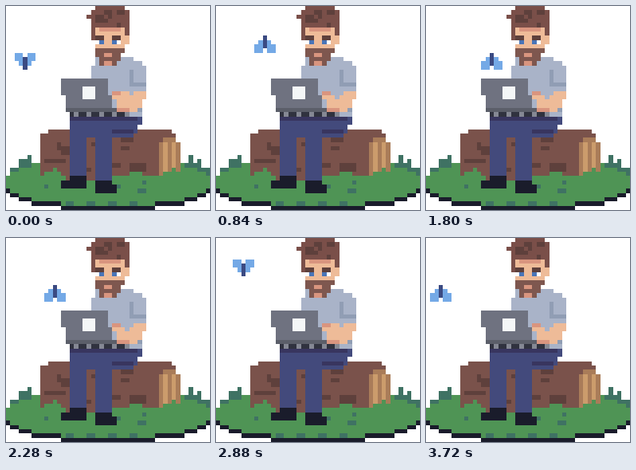
An HTML page with a canvas for the animation above (3840 ms loop, 256x256 px).

```html
<!DOCTYPE html>
<html lang="en">
<head>
<meta charset="utf-8">
<title>Working outdoors</title>
<style>
html, body { margin: 0; width: 100%; height: 100%; overflow: hidden; background: #fff; }
canvas { display: block; width: 256px; height: 256px; }
</style>
</head>
<body>
<canvas width="256" height="256"></canvas>
<script>
const ctx = document.querySelector('canvas').getContext('2d');
const CELL = 256 / 48, STEP = 120, STEPS = 32;
const GREEN = '#4f9455', TEAL = '#3f7263', BARK = '#7a524b', DARK_BARK = '#5e403c';
const SKIN = '#eebb98', BLUSH = '#d9957f', SHIRT = '#a9b3c8', FOLD = '#909db4';
const DENIM = '#434a7c', DARK_DENIM = '#38355f', INK = '#1a1c2b', METAL = '#6f7280';

const snap = v => Math.round(v * CELL);
const mix = (a, b, k) => a + (b - a) * k;

// All shapes are measured in cells of a 48 x 48 grid.
function block(color, x, y, w, h) {
  const left = snap(x), top = snap(y);
  ctx.fillStyle = color;
  ctx.fillRect(left, top, snap(x + w) - left, snap(y + h) - top);
}

// Superellipse, one strip per row.
function blob(color, cx, cy, rx, ry, power) {
  for (let y = cy - ry; y < cy + ry; y++) {
    const v = Math.abs(y + 0.5 - cy) / ry;
    const half = rx * (1 - v ** power) ** (1 / power);
    const left = Math.round(cx - half), right = Math.round(cx + half);
    block(color, left, y, right - left, 1);
  }
}

// Rows whose left and right ends slide from one span to another.
function taper(color, top, rows, [l0, r0], [l1, r1]) {
  for (let i = 0; i < rows; i++) {
    const k = i / (rows - 1), left = Math.round(mix(l0, l1, k));
    block(color, left, top + i, Math.round(mix(r0, r1, k)) - left, 1);
  }
}

function randomFrom(seed) {
  return () => (seed = seed * 16807 % 2147483647) / 2147483647;
}

function streaks(color, count, seed, x, y, w, h) {
  const random = randomFrom(seed);
  for (let i = 0; i < count; i++) {
    const length = 1 + Math.floor(random() * 4);
    block(color, x + Math.floor(random() * (w - length)), y + Math.floor(random() * h), length, 1);
  }
}

// Blades stand on the base row and alternate between tall and short.
function grass(color, from, to, base, height, seed) {
  const random = randomFrom(seed);
  for (let x = from; x < to; x++) {
    const arch = Math.sin((x - from + 1) / (to - from + 1) * Math.PI);
    const tall = Math.round(height * arch * (x % 2 ? 1 : 0.5 + 0.3 * random()));
    block(color, x, base - tall, 1, tall);
  }
}

function ground() {
  grass(TEAL, 1, 9, 40, 5, 7);
  grass(TEAL, 40, 48, 40, 5, 11);
  blob(INK, 24, 42.5, 24, 5.5, 2.2);
  blob(GREEN, 24, 41.5, 24, 5.5, 2.2);
  streaks(TEAL, 7, 23, 9, 41, 30, 3);
  for (let x = 14; x < 34; x += 5) block(TEAL, x, 46, 2, 1);
}

function log() {
  blob(BARK, 22.5, 35, 14.5, 6, 6);
  taper(BARK, 29, 2, [33, 39], [33, 40]);
  streaks(DARK_BARK, 14, 41, 9, 31, 28, 8);
  blob('#a97c59', 38.5, 36, 2.5, 5, 4);
  for (let x = 37; x < 41; x += 2) block('#cb9c6c', x, 32, 1, 7);
  grass(GREEN, 8, 14, 41, 3, 5);
  grass(GREEN, 25, 36, 41, 2, 17);
  grass(GREEN, 36, 44, 41, 3, 29);
}

function legs() {
  taper(DENIM, 26, 5, [15, 32], [15, 30]);
  block(DARK_DENIM, 15, 26, 16, 1);
  block(DARK_DENIM, 25, 29, 5, 1);
  for (const [x, foot] of [[15, 40], [21, 41]]) {
    block(DENIM, x, 28, 4, foot - 28);
    block(INK, x, foot, 4, 2);
  }
  block(INK, 13, 41, 6, 2);
  block(INK, 21, 42, 5, 2);
}

function torso() {
  taper(SHIRT, 12, 3, [21, 30], [20, 33]);
  block(SHIRT, 20, 15, 13, 5);
  block(SHIRT, 24, 20, 8, 6);
  block(FOLD, 30, 18, 3, 1);
  block(FOLD, 29, 15, 1, 4);
  block(FOLD, 28, 24, 4, 1);
}

function arms(beat) {
  taper(SKIN, 20, 5, [30, 33], [26, 31]);
  taper(SKIN, 20, 5, [25, beat ? 27 : 29], [26, 31]);
  block(BLUSH, 25, 20, 2, 1);
  block(BLUSH, 26, 24, 3, 1);
}

function head() {
  const hair = '#7a4f49';
  blob(hair, 24.5, 4.5, 4.8, 4.5, 3);
  block(hair, 19, 2, 3, 1);
  streaks(DARK_BARK, 8, 53, 20, 1, 9, 4);
  block(SKIN, 21, 5, 7, 6);
  block(BLUSH, 22, 5, 5, 1);
  block(SKIN, 28, 7, 1, 2);
  for (const side of [-1, 1]) {
    const eye = 24 + side * 1.5 - 0.5;
    block(DARK_BARK, eye + side / 2 - 0.5, 7, 2, 1);
    block('#fff', eye + side, 8, 1, 1);
    block('#4975b8', eye, 8, 1, 1);
  }
  taper('#7e574f', 10, 4, [21, 28], [22, 26]);
  block(BLUSH, 23, 11, 2, 1);
  block(BLUSH, 23, 13, 2, 1);
}

function laptop() {
  taper(METAL, 17, 8, [13, 24], [14, 25]);
  block('#5b5e69', 14, 24, 15, 1);
  block('#30323f', 15, 25, 14, 1);
  for (let x = 16; x < 29; x += 3) block('#858894', x, 25, 1, 1);
  block('#f4f6f7', 18, 19, 3, 3);
}

function butterfly(step, down) {
  const turn = step * 2 * Math.PI / STEPS;
  const x = Math.round(9 - 6 * Math.cos(turn + 3 * Math.PI / 16));
  const y = Math.round(8 + down + 3.2 * Math.cos(2 * turn - Math.PI / 8));
  for (const side of [-1, 1]) {
    block('#74a9e6', x + 2 * side, y + 2 * down, 1, 2);
    block('#74a9e6', x + side, y + down, 1, 3);
  }
  block('#3b4a82', x, y + 1 - down, 1, 3);
}

function draw(now) {
  const step = Math.floor(now / STEP) % STEPS, beat = step % 2;
  block('#fff', 0, 0, 48, 48);
  for (const part of [ground, log, legs, torso, head, laptop]) part();
  arms(beat);
  butterfly(step, beat);
  requestAnimationFrame(draw);
}
draw(performance.now());
</script>
</body>
</html>
```
